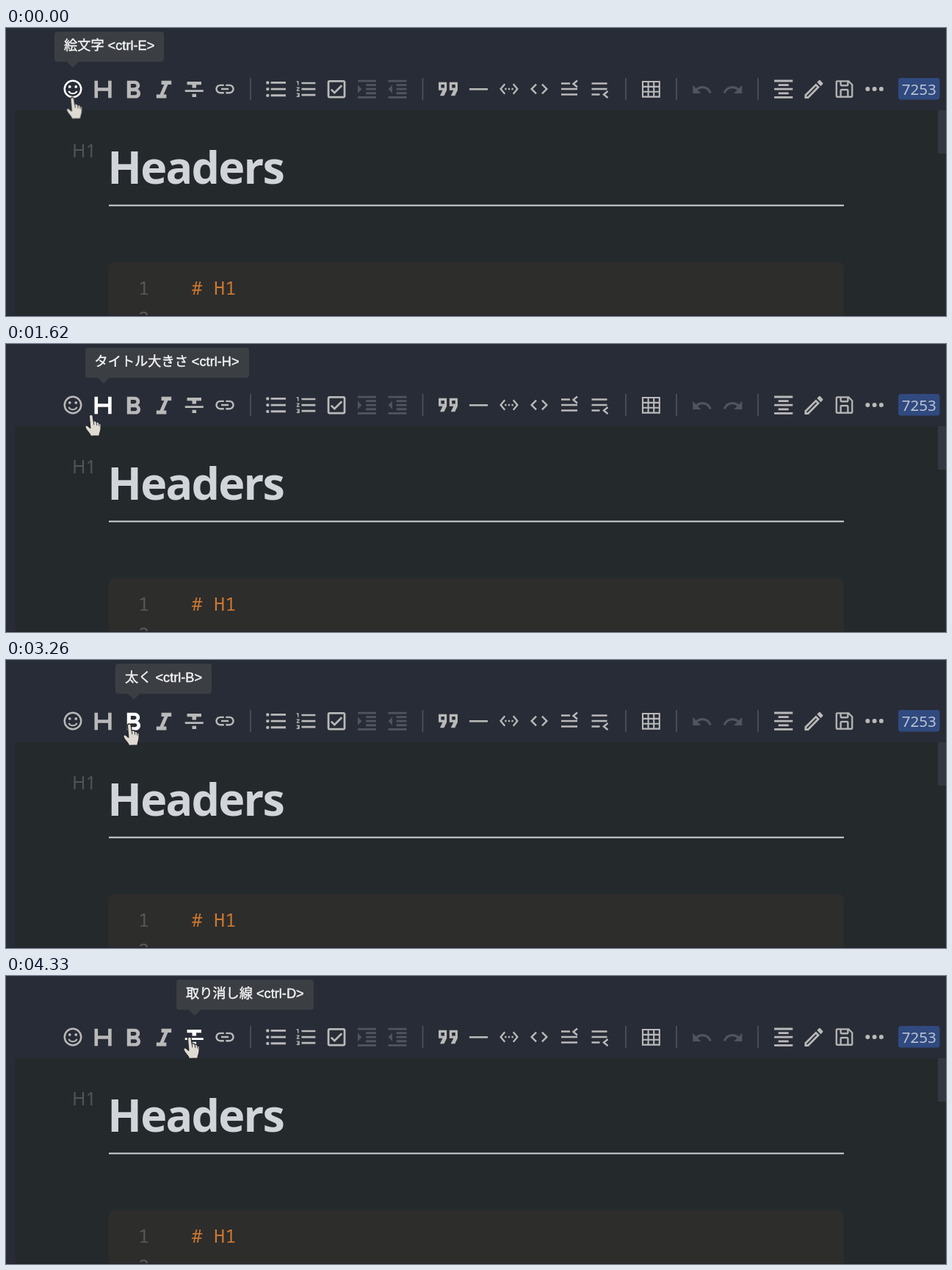
An HTML page for the animation above (5.64 s loop, 1280 px wide and 392 px high).

```html
<!DOCTYPE html>
<html lang="ja">
<head>
<meta charset="utf-8">
<title>Editor toolbar</title>
<style>
  :root { --icon: #b9b9b9; --tip: #3b3e43; --loop: 5640ms step-end infinite; }
  html, body { margin: 0; width: 100%; height: 100%; overflow: hidden; background: #282c36; }
  svg { position: absolute; left: 0; top: 0; }
  .icons { color: var(--icon); fill: currentColor; }
  .line { fill: none; stroke: currentColor; }
  .dim { color: #50545c; }
  .ui { font-family: "Noto Sans", "Open Sans", sans-serif; }
  .code { font: 25.4px "Noto Sans Mono", "DejaVu Sans Mono", monospace; }

  .tip {
    position: absolute; top: 5px; height: 41px; padding: 0 13px; box-sizing: border-box;
    border-radius: 4px; background: var(--tip); color: #f4f4f4; white-space: nowrap;
    font: 18.2px/38px "Liberation Sans", "Noto Sans CJK JP", "Noto Sans CJK", sans-serif;
    -webkit-text-stroke: .45px; opacity: 0;
  }
  .tip::after {
    content: ""; position: absolute; left: 17px; top: 41px;
    border: 8px solid transparent; border-top-color: var(--tip); border-bottom: 0;
  }
  .tip1 { left: 66px; animation: tip1 var(--loop); }
  .tip2 { left: 107.5px; animation: tip2 var(--loop); }
  .tip3 { left: 149px; animation: tip3 var(--loop); }
  .tip4 { left: 190px; animation: tip4 var(--loop); }
  .tip5 { left: 232px; animation: tip5 var(--loop); }
  @keyframes tip1 { 0% { opacity: 1 } 25.88% { opacity: 0 } }
  @keyframes tip2 { 25.88% { opacity: .05 } 27.3% { opacity: .5 } 28.72% { opacity: 1 } 46.63% { opacity: 0 } }
  @keyframes tip3 { 46.63% { opacity: .04 } 47.87% { opacity: .5 } 49.29% { opacity: 1 } 60.46% { opacity: 0 } }
  @keyframes tip4 { 60.46% { opacity: .08 } 61.87% { opacity: .5 } 63.29% { opacity: 1 } 73.93% { opacity: 0 } }
  @keyframes tip5 { 73.93% { opacity: .06 } 75.35% { opacity: .5 } 76.77% { opacity: 1 } }

  .hot1 { animation: hot1 var(--loop); }
  .hot2 { animation: hot2 var(--loop); }
  .hot3 { animation: hot3 var(--loop); }
  .hot4 { animation: hot4 var(--loop); }
  .hot5 { animation: hot5 var(--loop); }
  @keyframes hot1 { 0% { color: #fff } 25.88% { color: var(--icon) } }
  @keyframes hot2 { 25.88% { color: #fff } 46.63% { color: var(--icon) } }
  @keyframes hot3 { 46.63% { color: #fff } 60.46% { color: var(--icon) } }
  @keyframes hot4 { 60.46% { color: #fff } 73.93% { color: var(--icon) } }
  @keyframes hot5 { 73.93% { color: #fff } }

  .hand { animation: hand var(--loop); }
  @keyframes hand {
    0% { transform: translate(90.5px, 94.5px) }
    21.98% { transform: translate(94.5px, 94.5px) }
    23.22% { transform: translate(101px, 95px) }
    24.64% { transform: translate(108px, 96px) }
    25.88% { transform: translate(113px, 96px) }
    27.3% { transform: translate(115px, 96px) }
    28.72% { transform: translate(116px, 96px) }
    42.55% { transform: translate(122px, 96px) }
    43.79% { transform: translate(133px, 94px) }
    45.21% { transform: translate(146px, 91px) }
    46.63% { transform: translate(157px, 88px) }
    47.87% { transform: translate(160px, 88px) }
    49.29% { transform: translate(161px, 88px) }
    57.8% { transform: translate(168px, 87px) }
    59.04% { transform: translate(184px, 85px) }
    60.46% { transform: translate(202px, 83px) }
    61.87% { transform: translate(208px, 83px) }
    63.29% { transform: translate(210px, 83px) }
    71.45% { transform: translate(217.5px, 82px) }
    72.69% { transform: translate(228px, 82px) }
    73.93% { transform: translate(240px, 82px) }
    75.35% { transform: translate(247px, 83px) }
    76.77% { transform: translate(250px, 83px) }
  }
</style>
</head>
<body>
<svg width="1280" height="392" viewBox="0 0 1280 392">
  <path fill="#24292c" d="M12 112H1280V392H12z"/>
  <path fill="#343842" d="M1269 112h11v59h-11z"/>

  <!-- document -->
  <g class="ui">
    <text x="90" y="175.5" font-size="25" fill="#50555a">H1</text>
    <text x="138.3" y="211.5" font-size="61" font-weight="700" letter-spacing="-1.8" fill="#d1d5da">Headers</text>
  </g>
  <path fill="#d1d5da" d="M140 240.6h1001v2H140z"/>
  <path fill="#2d2d2b" d="M140 392V327q0-8 8-8H1133q8 0 8 8V392z"/>
  <g class="code">
    <text x="180" y="363" fill="#56585a">1</text>
    <text x="180" y="404" fill="#56585a">2</text>
    <text x="252.5" y="363" fill="#cc7832" xml:space="preserve"># H1</text>
  </g>
  <path fill="#20232a" d="M0 391h1280v1H0z"/>

  <!-- toolbar -->
  <path stroke="#50545c" stroke-width="1.6" d="M333 68v30M567.5 68v30M844 68v30M913 68v30M1024 68v30"/>
  <g class="icons">
    <g class="hot1" transform="translate(76 68) scale(1.25)">
      <circle class="line" cx="12" cy="12" r="9" stroke-width="2"/>
      <circle cx="8.6" cy="9.5" r="1.5"/><circle cx="15.4" cy="9.5" r="1.5"/>
      <path class="line" stroke-width="1.7" d="M7.5 14.3c1.8 3.6 7.2 3.6 9 0"/>
    </g>
    <path class="hot2" d="M120.5 71.7h4.6v9.6h14v-9.6h4.6v23.6h-4.6v-9.6h-14v9.6h-4.6z"/>
    <path class="hot3" transform="translate(152.9 65) scale(1.7)" d="M15.6 10.79c.97-.67 1.65-1.77 1.65-2.79 0-2.26-1.75-4-4-4H7v14h7.04c2.09 0 3.71-1.7 3.71-3.79 0-1.52-.86-2.82-2.15-3.42zM10 6.5h3c.83 0 1.5.67 1.5 1.5s-.67 1.5-1.5 1.5h-3v-3zm3.5 9H10v-3h3.5c.83 0 1.5.67 1.5 1.5s-.67 1.5-1.5 1.5z"/>
    <path class="hot4" transform="translate(194.6 65) scale(1.7)" d="M10 4v3h2.21l-3.42 8H6v3h8v-3h-2.21l3.42-8H18V4z"/>
    <path class="hot5" transform="translate(239.6 67.5) scale(1.39)" d="M10 19h4v-3h-4zM5 4v3h5v3h4V7h5V4zM3 14h18v-2H3z"/>
    <path transform="translate(282.8 67.8) scale(1.27)" d="M3.9 12c0-1.71 1.39-3.1 3.1-3.1h4V7H7c-2.76 0-5 2.24-5 5s2.24 5 5 5h4v-1.9H7c-1.71 0-3.1-1.39-3.1-3.1zM8 13h8v-2H8zm9-6h-4v1.9h4c1.71 0 3.1 1.39 3.1 3.1s-1.39 3.1-3.1 3.1h-4V17h4c2.76 0 5-2.24 5-5s-2.24-5-5-5z"/>

    <g transform="translate(350.5 65.7) scale(1.45)">
      <circle cx="4" cy="6" r="1.5"/><circle cx="4" cy="12" r="1.5"/><circle cx="4" cy="18" r="1.5"/>
      <path d="M7 5h14v2H7zM7 11h14v2H7zM7 17h14v2H7z"/>
    </g>
    <path transform="translate(393 66.9) scale(1.35)" d="M2 17h2v.5H3v1h1v.5H2v1h3v-4H2zm1-9h1V4H2v1h1zm-1 3h1.8L2 13.1v.9h3v-1H3.2L5 10.9V10H2zm5-6v2h14V5zm0 14h14v-2H7zm0-6h14v-2H7z"/>
    <path transform="translate(433.6 66.8) scale(1.37)" d="M19 3H5c-1.1 0-2 .9-2 2v14c0 1.1.9 2 2 2h14c1.1 0 2-.9 2-2V5c0-1.1-.9-2-2-2zm0 16H5V5h14zM17.99 9l-1.41-1.42-6.59 6.59-2.58-2.57-1.42 1.41 4 3.99z"/>
    <g class="dim">
      <path transform="translate(474.8 66.5) scale(1.39)" d="M3 21h18v-2H3zM3 8v8l4-4zm8 9h10v-2H11zM3 3v2h18V3zm8 6h10V7H11zm0 4h10v-2H11z"/>
      <path transform="translate(516.3 66.5) scale(1.39)" d="M11 17h10v-2H11zm-8-5l4 4V8zm0 9h18v-2H3zM3 3v2h18V3zm8 6h10V7H11zm0 4h10v-2H11z"/>
    </g>

    <path fill-rule="evenodd" transform="translate(579.8 60.8) scale(1.85)" d="M6 17h3l2-4V7H5v6h3zm8 0h3l2-4V7h-6v6h3zM6.8 8.7h2.5v2.5H6.8zM14.8 8.7h2.5v2.5h-2.5z"/>
    <path d="M631 82h25v2.6h-25z"/>
    <path transform="translate(671.2 69.2) scale(1.15)" d="M7.77 6.76L6.23 5.48.82 12l5.41 6.52 1.54-1.28L3.42 12zM7 13h2v-2H7zm10-2h-2v2h2zm-6 2h2v-2h-2zm6.77-7.52l-1.54 1.28L20.58 12l-4.35 5.24 1.54 1.28L23.18 12z"/>
    <path transform="translate(711.6 68.6) scale(1.2)" d="M9.4 16.6L4.8 12l4.6-4.6L8 6l-6 6 6 6zm5.2 0l4.6-4.6-4.6-4.6L16 6l6 6-6 6z"/>
    <path class="line" stroke-width="2.4" d="M756 75.5h12M756 83h22M756 90.5h22M778 71.5l-5.5 4.5 5.5 4.5"/>
    <path class="line" stroke-width="2.4" d="M797.5 75.5h21M797.5 83h21M797.5 90.5h11M819.5 86l-5.5 4.5 5.5 4.5"/>
    <path class="line" stroke-width="2.1" d="M867 73h22.8v20.6H867zM874.6 73v21M882.2 73v21M867 79.9h23M867 86.7h23"/>

    <g class="dim">
      <path id="undo" transform="translate(932.7 69) scale(1.25)" d="M12.5 8c-2.65 0-5.05.99-6.9 2.6L2 7v9h9l-3.62-3.62c1.39-1.16 3.16-1.88 5.12-1.88 3.54 0 6.55 2.31 7.6 5.5l2.37-.78C21.08 11.03 17.15 8 12.5 8z"/>
      <use href="#undo" transform="matrix(-1 0 0 1 1937.5 0)"/>
    </g>
    <path transform="translate(1041.9 66.4) scale(1.4)" d="M7 15v2h10v-2zm-4 6h18v-2H3zm0-8h18v-2H3zm4-6v2h10V7zM3 3v2h18V3z"/>
    <path transform="translate(1083.3 66.8) scale(1.39)" d="M14.06 9.02l.92.92L5.92 19H5v-.92l9.06-9.06M17.66 3c-.25 0-.51.1-.7.29l-1.83 1.83 3.75 3.75 1.83-1.83c.39-.39.39-1.02 0-1.41l-2.34-2.34c-.2-.2-.45-.29-.71-.29zm-3.6 3.19L3 17.25V21h3.75L17.81 9.94z"/>
    <path stroke="currentColor" stroke-width=".4" transform="translate(1126 67.5) scale(.97)" d="M27.71 9.29l-5-5A1 1 0 0 0 22 4H6a2 2 0 0 0-2 2v20a2 2 0 0 0 2 2h20a2 2 0 0 0 2-2V10a1 1 0 0 0-.29-.71zM12 6h8v4h-8zm8 20h-8v-8h8zm2 0v-8a2 2 0 0 0-2-2h-8a2 2 0 0 0-2 2v8H6V6h4v4a2 2 0 0 0 2 2h8a2 2 0 0 0 2-2V6.41l4 4V26z"/>
    <circle cx="1173.3" cy="83" r="3"/><circle cx="1182.6" cy="83" r="3"/><circle cx="1191.9" cy="83" r="3"/>
  </g>
  <rect x="1215" y="68" width="56.5" height="29.5" rx="4" fill="#304a80"/>
  <text class="ui" x="1243.2" y="91" font-size="20.5" text-anchor="middle" fill="#bcc3ce">7253</text>
</svg>

<div class="tip tip1">絵文字 &lt;ctrl-E&gt;</div>
<div class="tip tip2">タイトル大きさ &lt;ctrl-H&gt;</div>
<div class="tip tip3">太く &lt;ctrl-B&gt;</div>
<div class="tip tip4">斜体 &lt;ctrl-I&gt;</div>
<div class="tip tip5">取り消し線 &lt;ctrl-D&gt;</div>

<svg width="1280" height="392" viewBox="0 0 1280 392">
  <g class="hand" stroke="#24262b" stroke-linejoin="round">
    <path fill="#dfdbd3" stroke-width="1.3" d="M-2.6 2.6C-2.8-.6 1.8-.9 2.2 2L3.2 9C5 8.2 6.8 8.8 7.2 10.4 9 9.6 10.4 10.4 10.6 12 12 11.6 13.2 12.6 13.2 14.2L13 20C12.8 23.5 11.4 24 11 29L-.6 29.5C-1 26-5.4 23.4-7.6 18.4-9.4 15.2-6.2 13.6-4 16L-1.2 18.4z"/>
    <path fill="none" stroke-width=".9" d="M3.2 9l.7 5.2M7.2 10.4l.5 4.4M10.6 12l.3 3.6"/>
  </g>
</svg>
</body>
</html>
```
